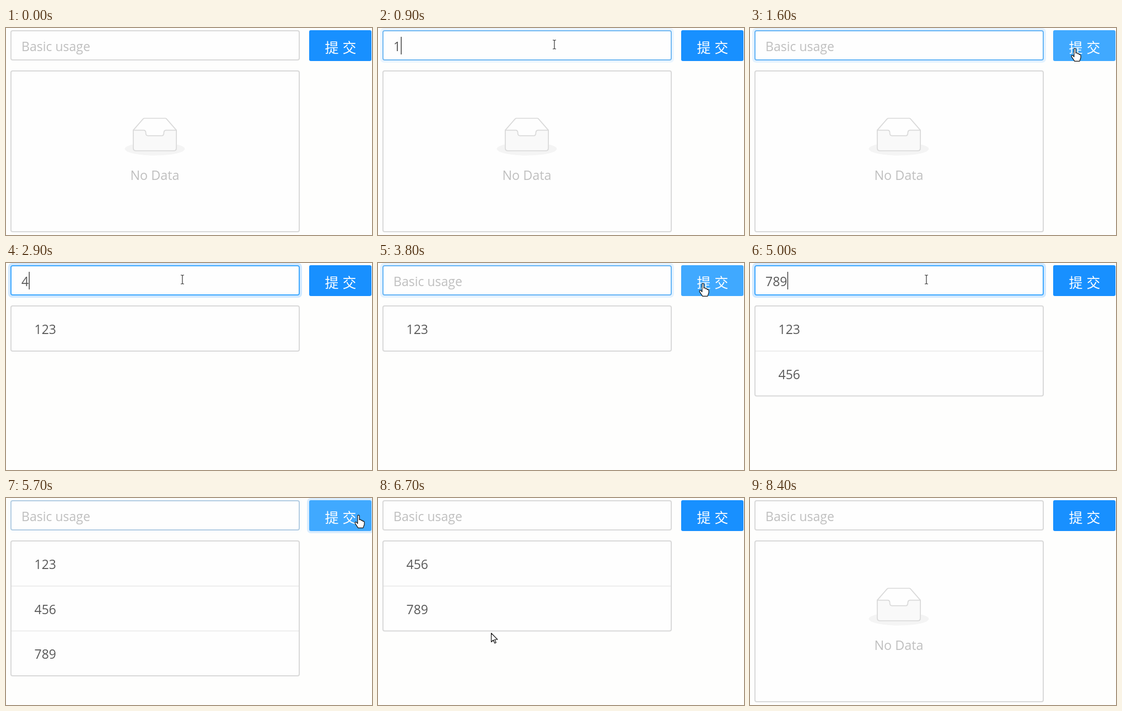
Write an HTML page that moves like this. It is 664 px wide and 376 px high and loops after 9000 ms.

```html
<!DOCTYPE html>
<html lang="en">
<head>
<meta charset="utf-8">
<title>List input</title>
<style>
html, body { margin: 0; width: 100%; height: 100%; overflow: hidden; background: #fefefd; }
svg { display: block; width: 664px; height: 376px; }
text { font: 23px "Open Sans", "Noto Sans", sans-serif; fill: #595959; }
.hint { fill: #bfbfbf; }
.none { font-size: 23.4px; fill: #bfbfbf; text-anchor: middle; }
.label { font: 100 25px "Noto Sans CJK SC", "Noto Sans CJK", sans-serif; fill: #fff; text-anchor: middle; }
.box { fill: #fefefe; stroke: #d9d9d9; stroke-width: 2; }
.glow { fill: none; stroke: #d1e9ff; stroke-width: 4; }
.line { stroke: #e8e8e8; stroke-width: 1.5; }
.art { stroke: #d9d9d9; stroke-width: 1; }
.pointer path { fill: #fff; stroke: #111; stroke-width: 1.2; stroke-linejoin: round; }
.pointer .beam { fill: none; stroke: #333; stroke-linejoin: miter; }
</style>
</head>
<body>
<svg viewBox="0 0 664 376">
  <rect class="glow" id="inputGlow" x="6" y="2" width="529" height="59" rx="5"/>
  <rect class="box" id="input" x="9" y="5" width="523" height="53" rx="3"/>
  <text class="hint" id="hint" x="28" y="42">Basic usage</text>
  <text id="typed" x="28" y="42"></text>
  <path id="caret" d="M0 16V48" stroke="#444" stroke-width="1.5"/>

  <rect class="glow" id="wave" x="548" y="2" width="117" height="60" rx="5"/>
  <rect id="button" x="550" y="4" width="113" height="56" rx="3"/>
  <text class="label" x="591" y="44.5">提</text>
  <text class="label" x="623" y="44.5">交</text>

  <rect class="box" id="list" x="9" y="78" width="523" rx="3"/>
  <g id="empty">
    <g transform="translate(215.6 163.5) scale(1.7)">
      <ellipse cx="32" cy="33" rx="32" ry="7" fill="#f4f4f4"/>
      <path class="art" fill="#fefefe" d="M9 13L19.5 1Q20.2 .3 21 .3H43Q43.8 .3 44.5 1L55 13V22H9Z"/>
      <path class="art" fill="#f9f9f9" d="M9 13H20Q22.4 13 22.4 16T24.6 18.9H39.4Q41.6 18.9 41.6 16T44 13H55V32Q55 35 52 35H12Q9 35 9 32Z"/>
    </g>
    <text class="none" x="270" y="276">No Data</text>
  </g>
  <g id="rows"></g>

  <g class="pointer" id="pointer">
    <path id="arrow" d="M.5 .5V16.5L4.2 13 6.8 18.8 9.2 17.8 6.6 12H11.8Z"/>
    <path id="hand" d="M-1.6 1.6C-1.6 -.4 1.6 -.4 1.6 1.6V8.6C3.5 7.6 5 8.4 5 10C6.6 9.2 8 10 8 11.4C9.6 10.8 10.6 11.6 10.6 13V17L8.4 23.4H-.6L-6 15.4C-7.2 13-5 11.6-3.4 13.4L-1.6 15.4Z"/>
    <path id="beam" class="beam" d="M-3 -8H-1L0 -7 1 -8H3M0 -7V7M-3 8H-1L0 7 1 8H3"/>
    <path id="resize" d="M-2 -3V2H-6L0 8 6 2H2V-3H6L0 -9-6 -3Z"/>
  </g>
</svg>
<script>
const LOOP = 9000, STEP = 100, KEY = 100, BLINK = 500;
const ENTER = 400, LEAVE = 8300, ROW = 81.5;

// Each round: focus the field, type a word, click the button.
const rounds = [
  { word: '123', focus: 700, type: 900, click: 1500, press: [589.5, 37] },
  { word: '456', focus: 2000, type: 2900, click: 3700, press: [589.5, 37] },
  { word: '789', focus: 4500, type: 4700, click: 5400, press: [639.5, 31] }
];
const removals = [6500, 7200, 7600];

const field = [320, 30], item = [205, 125];
const stops = [
  ...rounds.flatMap(r => [{ at: r.focus, to: field }, { at: r.click, to: r.press }]),
  { at: 4300, to: [309, 0] },
  { at: removals[0] - STEP, to: item },
  { at: 6700, to: [205, 245] },
  { at: removals[1] - STEP, to: item },
  { at: LEAVE, to: [235, 380] }
].sort((a, b) => a.at - b.at);

const $ = id => document.getElementById(id);
const show = (el, on) => el.setAttribute('visibility', on ? 'inherit' : 'hidden');
const lerp = (a, b, p) => a.map((v, i) => v + (b[i] - v) * p);
const ramp = (t, from, span) => Math.min(1, Math.max(0, (t - from) / span));
const ease = p => p * p * (3 - 2 * p);
const rise = (t, from, up, fall, down) => ramp(t, from, up) * (1 - ramp(t, fall, down));
const strongest = level => Math.max(...rounds.map(level));
const rgb = c => `rgb(${c.map(Math.round)})`;

$('rows').innerHTML = rounds.map((r, i) => `<g>
  ${i ? `<path class="line" d="M10 ${78.5 + ROW * i}H531"/>` : ''}
  <text x="51.5" y="${129 + ROW * i}"></text></g>`).join('');
const rows = [...$('rows').children];

function drawField(t) {
  const level = strongest(r => rise(t, r.focus, 300, r.click, 400));
  $('input').style.stroke = rgb(lerp([217, 217, 217], [64, 169, 255], level));
  $('inputGlow').setAttribute('opacity', level * level);

  const active = rounds.find(r => t >= r.focus && t <= r.click);
  const count = active ? Math.max(0, Math.floor((t - active.type) / KEY) + 1) : 0;
  const text = active ? active.word.slice(0, count) : '';
  $('typed').textContent = text;
  show($('hint'), !text);

  const idle = active && t - (text ? active.type + (text.length - 1) * KEY : active.focus);
  show($('caret'), active && Math.floor(idle / BLINK) % 2 === 0);
  const x = 29 + (text ? $('typed').getComputedTextLength() : 0);
  $('caret').setAttribute('transform', `translate(${x})`);
}

function drawButton(t) {
  const lit = strongest(r => rise(t, r.click - 200, 200, r.click + 300, 500));
  const wave = strongest(r => rise(t, r.click + 100, 100, r.click + 200, 500));
  $('button').setAttribute('fill', rgb(lerp([24, 144, 255], [64, 169, 255], lit)));
  $('wave').setAttribute('opacity', wave);
}

function drawList(t) {
  const added = rounds.filter(r => t >= r.click + 200);
  const items = added.slice(removals.filter(at => t >= at).length);
  const n = items.length;
  $('list').setAttribute('height', n ? ROW * n + .5 : 292);
  show($('empty'), !n);
  rows.forEach((row, i) => {
    show(row, i < n);
    row.querySelector('text').textContent = i < n ? items[i].word : '';
  });
}

function drawPointer(t) {
  const glide = 300;
  const [x, y] = stops.reduce(
    (pos, s) => lerp(pos, s.to, ease(ramp(t, s.at - glide, glide))), [655, 118]);
  const kind = y < 3 ? 'resize'
    : y < 60 && x > 550 ? 'hand'
    : y < 60 && x < 533 ? 'beam' : 'arrow';
  show($('pointer'), t >= ENTER && t < LEAVE);
  $('pointer').setAttribute('transform', `translate(${x} ${y})`);
  for (const shape of $('pointer').children) show(shape, shape.id === kind);
}

const start = performance.now();
function tick() {
  const t = Math.floor((performance.now() - start) % LOOP / STEP) * STEP;
  [drawField, drawButton, drawList, drawPointer].forEach(draw => draw(t));
  requestAnimationFrame(tick);
}
tick();
</script>
</body>
</html>
```
